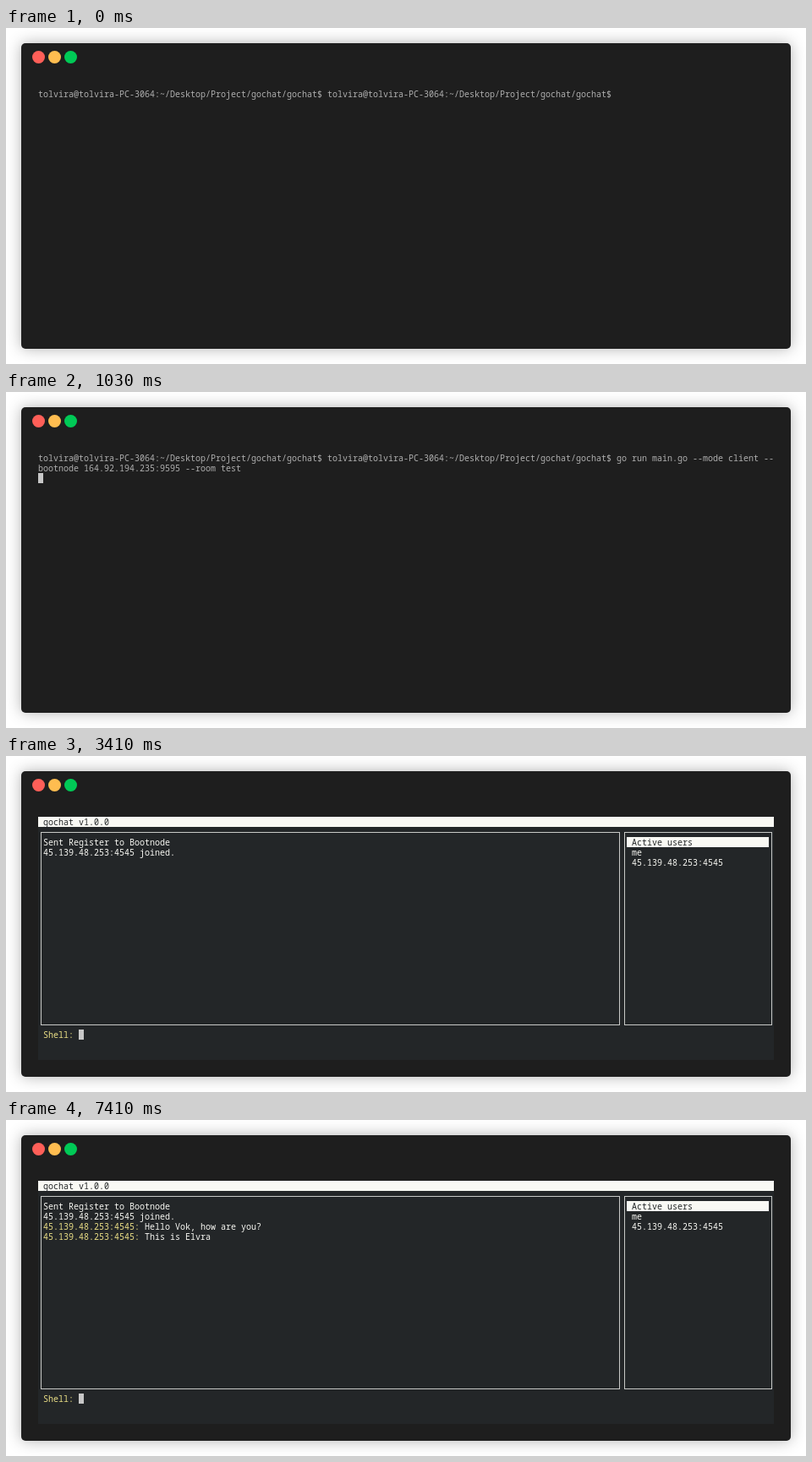
An HTML page with a canvas that plays this animation: 946x398 px, repeating every 8 s.

```html
<!DOCTYPE html>
<html lang="en">
<head>
<meta charset="utf-8">
<title>Terminal chat</title>
<style>
html, body { margin: 0; width: 100%; height: 100%; overflow: hidden; background: #fff; }
canvas { display: block; }
</style>
</head>
<body>
<canvas id="stage" width="946" height="398"></canvas>
<script>
const ctx = document.getElementById('stage').getContext('2d');
const LOOP = 8000;
const CELL_W = 6, CELL_H = 12, LEFT = 38, TOP = 72;
const FG = '#afafaf', CURSOR = '#c7c7c7', PANEL = '#232628';
const WHITE = '#f9f9f4', YELLOW = '#ebdf86', LINE = '#c8c9c7';

const PEER = '45.139.48.253:4545';
const PROMPT = 'tolvira@tolvira-PC-3064:~/Desktop/Project/gochat/gochat$ ';

// Start times of each step
const TYPED = 410, ENTERED = 1030, OPENED = 1310, REGISTERED = 1410;
const JOINED = 3410, GREETED = 5410, NAMED = 7410;

function fillCells(col, row, cols, rows, color) {
  ctx.fillStyle = color;
  ctx.fillRect(LEFT + col * CELL_W, TOP + row * CELL_H, cols * CELL_W, rows * CELL_H);
}

function print(col, row, text, color) {
  ctx.fillStyle = color;
  ctx.fillText(text, LEFT + col * CELL_W, TOP + row * CELL_H + 10);
}

function cursor(col, row) {
  fillCells(col, row, 1, 1, CURSOR);
}

function drawBox(x, y, w, h) {
  ctx.strokeStyle = LINE;
  ctx.strokeRect(x + 0.5, y + 0.5, w, h);
}

function drawWindow() {
  ctx.fillStyle = '#fff';
  ctx.fillRect(0, 0, 946, 398);
  ctx.save();
  ctx.shadowColor = 'rgba(0, 0, 0, 0.3)';
  ctx.shadowBlur = 18;
  ctx.fillStyle = '#1e1e1e';
  ctx.beginPath();
  ctx.roundRect(18, 18, 910, 362, 5);
  ctx.fill();
  ctx.restore();
  ['#ff5f58', '#ffbd50', '#00ca56'].forEach((color, i) => {
    ctx.fillStyle = color;
    ctx.beginPath();
    ctx.arc(38.5 + 19 * i, 34.5, 7.5, 0, 2 * Math.PI);
    ctx.fill();
  });
}

function drawPrompt(t) {
  print(0, 0, PROMPT + PROMPT, FG);
  if (t < TYPED) return;
  print(114, 0, 'go run main.go --mode client --', FG);
  print(0, 1, 'bootnode 164.92.194.235:9595 --room test', FG);
  if (t < ENTERED) cursor(40, 1);
  else cursor(0, 2);
}

function drawMessage(row, text) {
  print(1, row, PEER + ':', YELLOW);
  print(21, row, text, WHITE);
}

function drawChat(t) {
  fillCells(0, 0, 145, 24, PANEL);
  fillCells(0, 0, 145, 1, WHITE);
  print(1, 0, 'gochat v1.0.0', PANEL);
  drawBox(41, 90, 684, 228);
  drawBox(731, 90, 174, 228);

  fillCells(116, 2, 28, 1, WHITE);
  print(117, 2, 'Active users', PANEL);
  print(117, 3, 'me', WHITE);
  print(1, 21, 'Shell:', YELLOW);
  cursor(8, 21);

  if (t >= REGISTERED) print(1, 2, 'Sent Register to Bootnode', WHITE);
  if (t >= JOINED) {
    print(1, 3, PEER + ' joined.', WHITE);
    print(117, 4, PEER, WHITE);
  }
  if (t >= GREETED) drawMessage(4, 'Hello Vok, how are you?');
  if (t >= NAMED) drawMessage(5, 'This is Elvra');
}

const start = performance.now();

function render() {
  const t = (performance.now() - start) % LOOP;
  ctx.font = '10px "Noto Sans Mono", monospace';
  ctx.lineWidth = 1;
  drawWindow();
  if (t < OPENED) drawPrompt(t);
  else drawChat(t);
  requestAnimationFrame(render);
}
render();
</script>
</body>
</html>
```
